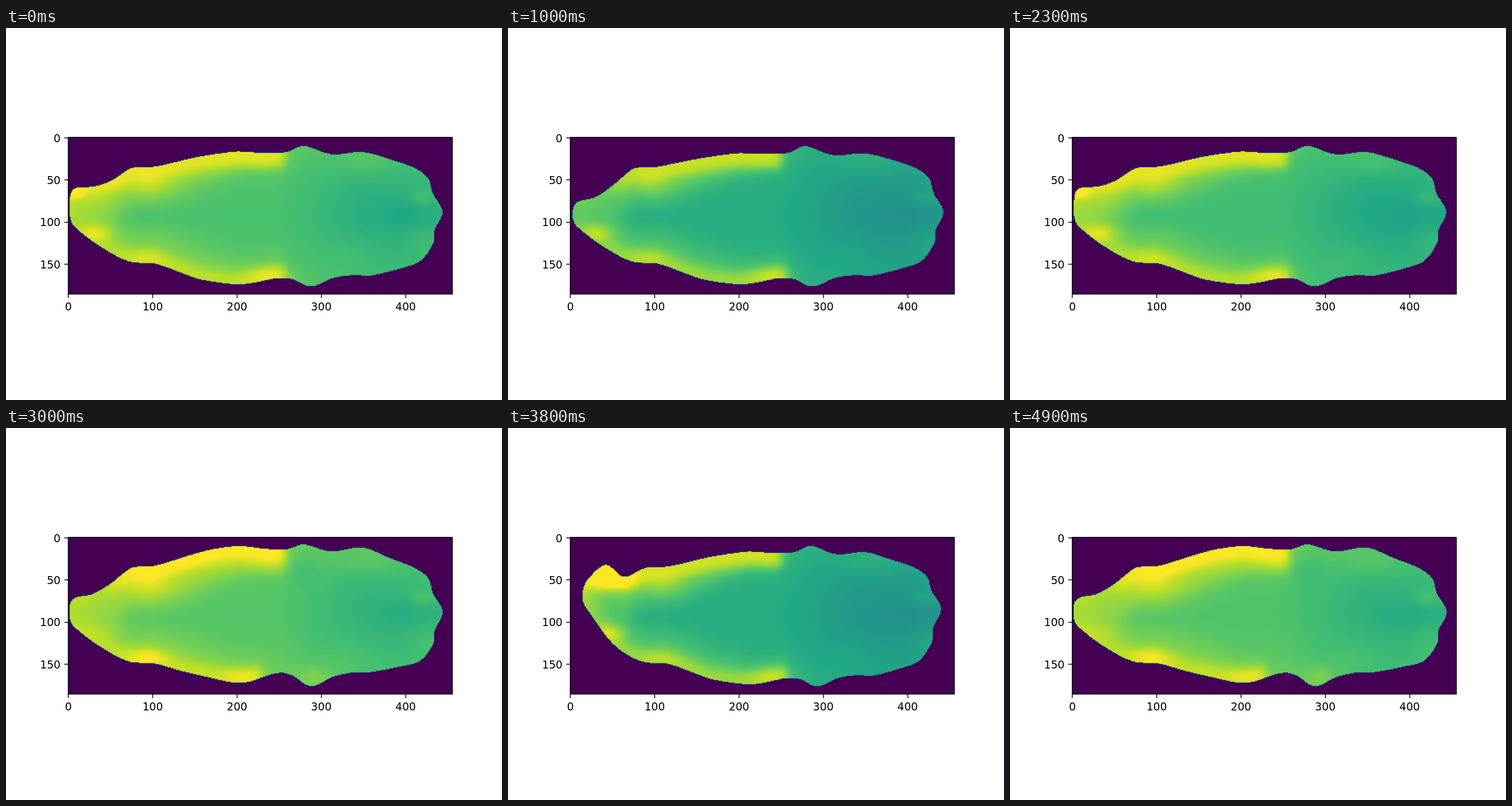
An HTML page with a canvas for the animation above (5 s loop, 864 by 648 pixels).

```html
<!DOCTYPE html>
<html lang="en">
<head>
<meta charset="utf-8">
<title>Height map</title>
<style>
  html, body { margin: 0; width: 100%; height: 100%; overflow: hidden; background: #fff; }
  canvas { position: absolute; left: 108px; top: 191px; }
  svg { position: absolute; left: 0; top: 0; }
  text { font: 18.75px "DejaVu Sans", sans-serif; fill: #000; }
  path { fill: none; stroke: #000; stroke-width: 1.5; }
</style>
</head>
<body>
<canvas id="map" width="670" height="273"></canvas>
<svg id="axes" width="864" height="648" viewBox="0 0 864 648"></svg>
<script>
const LOOP = 5000, STEP = 100;
const COLS = 456, ROWS = 186, W = 670, H = 273;
const LEFT = 108, TOP = 190.68, CELL = 669.6 / COLS;

// Resting outline in stage pixels, clockwise from the nose
const outline = [
  [111, 310], [113, 288], [123, 278], [152, 276], [183, 266], [212, 247], [228, 242], [260, 241],
  [300, 232], [348, 222], [402, 215], [445, 217], [487, 216], [518, 205], [552, 216], [575, 220],
  [622, 216], [670, 229], [712, 244], [735, 262], [743, 288], [760, 320], [746, 352], [744, 374],
  [722, 405], [685, 419], [635, 431], [607, 430], [570, 435], [531, 450], [498, 437], [470, 436],
  [410, 446], [345, 439], [300, 424], [258, 410], [213, 406], [165, 381], [122, 348], [112, 331]];

// How far the animal is lowered, its nose tucked, back arched, head raised
const keys = [
  { t: 0,    low: 0,    tuck: 0,   arch: 0,   lift: 0 },
  { t: 1000, low: .1,   tuck: 1.4, arch: -.3, lift: 0 },
  { t: 1700, low: .1,   tuck: 1.5, arch: 1,   lift: 0 },
  { t: 2300, low: .025, tuck: 0,   arch: 0,   lift: 0 },
  { t: 3000, low: -.02, tuck: 1,   arch: 1,   lift: 0 },
  { t: 3800, low: .1,   tuck: 0,   arch: 0,   lift: 1 },
  { t: 4900, low: -.01, tuck: 1,   arch: 1,   lift: 0 },
];

const mix = (a, b, k) => a + (b - a) * k;
const clamp = v => Math.min(1, Math.max(0, v));
const smooth = k => k * k * (3 - 2 * k);
const ramp = (a, b, v) => smooth(clamp((v - a) / (b - a)));
const sig = v => 1 / (1 + Math.exp(-v));

function blob(x, y, cx, cy, rx, ry) {
  const d = ((x - cx) / rx) ** 2 + ((y - cy) / ry) ** 2;
  return d > 9 ? 0 : Math.exp(-d);
}

// Viridis, as 256 RGB entries
const stops = ['440154', '482475', '414487', '355f8d', '2a788e', '21918c',
  '22a884', '44bf70', '7ad151', 'bddf26', 'fde725'].map(h => parseInt(h, 16));
const lut = Array.from({ length: 256 }, (_, i) => {
  const s = i / 25.5, n = Math.min(9, Math.floor(s));
  return [16, 8, 0].map(b =>
    Math.round(mix(stops[n] >> b & 255, stops[n + 1] >> b & 255, s - n)));
});

function poseAt(t) {
  let i = 0;
  while (i < keys.length - 1 && t >= keys[i + 1].t) i++;
  const a = keys[i], b = keys[i + 1] || a;
  const k = a === b ? 0 : smooth((t - a.t) / (b.t - a.t));
  const pose = {};
  for (const name in a) pose[name] = mix(a[name], b[name], k);
  return pose;
}

// Bends the resting outline with a few soft pulls.
function bend([x, y], { low, tuck, arch, lift }) {
  const pull = (...at) => blob(x, y, ...at);
  const back = 10 * pull(390, 220, 110, 30) + 8 * pull(610, 216, 55, 25);
  const belly = 10 * pull(478, 435, 28, 30) + 6 * pull(640, 430, 70, 30)
    + 7 * pull(350, 438, 60, 25);
  const head = 38 * pull(148, 272, 27, 30) + 30 * pull(115, 340, 55, 40);
  const dy = tuck * 17 * pull(125, 283, 55, 35)
    - arch * back - Math.max(0, arch) * belly
    - lift * (head + 6 * pull(760, 310, 50, 80));
  const dx = lift * mix(17, -4, ramp(350, 760, x)) - low * .06 * (x - 435);
  return [x + dx, y + dy];
}

const maskCanvas = document.createElement('canvas');
maskCanvas.width = COLS;
maskCanvas.height = ROWS;
const mask = maskCanvas.getContext('2d', { willReadFrequently: true });

function fillOutline(pts) {
  const n = pts.length, at = i => pts[(i + n) % n];
  mask.setTransform(1, 0, 0, 1, 0, 0);
  mask.clearRect(0, 0, COLS, ROWS);
  mask.setTransform(1 / CELL, 0, 0, 1 / CELL, -LEFT / CELL, -TOP / CELL);
  mask.beginPath();
  mask.moveTo(...at(0));
  for (let i = 0; i < n; i++) {
    const [a, b, c, d] = [at(i - 1), at(i), at(i + 1), at(i + 2)];
    mask.bezierCurveTo(b[0] + (c[0] - a[0]) / 6, b[1] + (c[1] - a[1]) / 6,
      c[0] - (d[0] - b[0]) / 6, c[1] - (d[1] - b[1]) / 6, c[0], c[1]);
  }
  mask.fill();
  return mask.getImageData(0, 0, COLS, ROWS).data;
}

// Top and bottom of each filled column, lightly smoothed
function columnEdges(inside) {
  const edge = Array.from({ length: COLS }, (_, c) => {
    let a = 0, b = ROWS - 1;
    while (a < ROWS && !inside(c, a)) a++;
    if (a === ROWS) return null;
    while (!inside(c, b)) b--;
    return [TOP + a * CELL, TOP + (b + 1) * CELL];
  });
  return edge.map((e, c) => {
    if (!e) return null;
    const near = edge.slice(Math.max(0, c - 4), c + 5).filter(Boolean);
    return [0, 1].map(s => near.reduce((sum, v) => sum + v[s], 0) / near.length);
  });
}

const field = new Float32Array(COLS * ROWS);

function computeField(pose) {
  const { low, tuck, arch, lift } = pose;
  const bow = Math.max(0, arch), rest = 1 - Math.min(1, tuck);
  const alpha = fillOutline(outline.map(p => bend(p, pose)));
  const inside = (c, r) => alpha[(r * COLS + c) * 4 + 3] > 127;
  const edges = columnEdges(inside);

  const nose = .81 + .05 * arch - .5 * low + .04 * lift;
  const topV = .965 + .04 * arch - .3 * low, botV = .9 - .5 * low;
  const topA = 185 - 125 * rest + 30 * lift, topB = 485 - 80 * low;
  const botB = 486 - 42 * bow;

  const spots = (x, y) => {
    const hx = x - 22 * lift;
    return .14 * rest * (1 - lift) * blob(x, y, 124, 285, 13, 11)
      + .32 * lift * blob(x, y, 177, 264, 33, 17)
      + (.13 - .1 * bow) * blob(hx, y, 155, 357, 28, 15)
      + (.05 + .05 * bow) * blob(hx, y, 245, 399, 34, 18)
      + .08 * blob(x, y, botB - 30, 430, 38, 15)
      + .07 * blob(hx, y, 245, 275, 45, 20)
      - .025 * blob(hx, y, 245, 331, 65, 18)
      + .06 * blob(x, y, 628, 230, 52, 30)
      + .06 * blob(x, y, 725, 295, 19, 14)
      + .03 * blob(x, y, 728, 368, 26, 28)
      + .03 * blob(x, y, 600, 398, 52, 34)
      - .03 * blob(x, y, 692, 325, 50, 24)
      + bow * .07 * blob(x, y, 538, 434, 26, 20)
      - bow * .03 * blob(x, y, 518, 250, 25, 22);
  };

  field.fill(0);
  for (let c = 0; c < COLS; c++) {
    if (!edges[c]) continue;
    const x = LEFT + (c + .5) * CELL, [y0, y1] = edges[c];
    const body = .71 - low - .085 * ramp(450, 640, x);
    const mid = mix(nose, body, ramp(112, 235, x));
    const rim = mix(.035, .055, ramp(420, 560, x));
    const topGate = sig((x - topA) / 15) * sig((topB - x) / 5);
    const botGate = sig((x - 155) / 18) * sig((botB - x) / 5);
    const along = ramp(260, 480, x);
    const thick = mix(12, 24, ramp(120, 250, x));
    const deep = mix(54, 26, along) + 14 * bow, soft = mix(15, 6, along);
    const botFade = mix(62, 34, along);
    for (let r = 0; r < ROWS; r++) {
      if (!inside(c, r)) continue;
      const y = TOP + (r + .5) * CELL;
      const up = Math.max(0, y - y0), down = Math.max(0, y1 - y);
      const off = 2 * up / (up + down + 1) - 1;
      const wt = .5 * sig((thick - up) / 5) + .5 * sig((deep - up) / soft);
      const wb = .45 * sig((20 - down) / 5) + .55 * Math.exp(-((down / botFade) ** 2));
      let v = mid + rim * off * off;
      v = mix(v, Math.max(v, topV), topGate * wt);
      v = mix(v, Math.max(v, botV), botGate * wb);
      field[r * COLS + c] = clamp(v + spots(x, y));
    }
  }
}

const map = document.getElementById('map').getContext('2d');
const image = map.createImageData(W, H);

const sampler = (size, count) => Array.from({ length: size }, (_, i) => {
  const s = Math.min(count - 1, Math.max(0, (i + .5) * count / size - .5));
  const n = Math.min(count - 2, Math.floor(s));
  return [n, smooth(s - n)];
});
const xs = sampler(W, COLS), ys = sampler(H, ROWS);

function draw(t) {
  computeField(poseAt(t));
  let o = 0;
  for (const [r, ky] of ys) {
    for (const [c, kx] of xs) {
      const i = r * COLS + c, j = i + COLS;
      const v = mix(mix(field[i], field[i + 1], kx), mix(field[j], field[j + 1], kx), ky);
      const rgb = lut[Math.min(255, Math.floor(v * 256))];
      image.data[o++] = rgb[0];
      image.data[o++] = rgb[1];
      image.data[o++] = rgb[2];
      image.data[o++] = 255;
    }
  }
  map.putImageData(image, 0, 0);
}

function drawAxes() {
  let lines = 'M108.5 190.5H777.5V463.5H108.5Z', labels = '';
  const label = (x, y, anchor, n) =>
    `<text x="${x}" y="${y}" text-anchor="${anchor}">${n}</text>`;
  for (let n = 0; n <= 400; n += 100) {
    const x = LEFT + (n + .5) * CELL;
    lines += `M${Math.floor(x) + .5} 464v6.5`;
    labels += label(x, 492, 'middle', n);
  }
  for (let n = 0; n <= 150; n += 50) {
    const y = TOP + (n + .5) * CELL;
    lines += `M108 ${Math.floor(y) + .5}h-6.5`;
    labels += label(95, Math.round(y + 7.1), 'end', n);
  }
  document.getElementById('axes').innerHTML = `<path d="${lines}"/>${labels}`;
}

const start = performance.now();
let shown = -1;
function tick() {
  const step = Math.floor((performance.now() - start) % LOOP / STEP);
  if (step !== shown) {
    shown = step;
    draw(step * STEP);
  }
  requestAnimationFrame(tick);
}
drawAxes();
tick();
</script>
</body>
</html>
```
